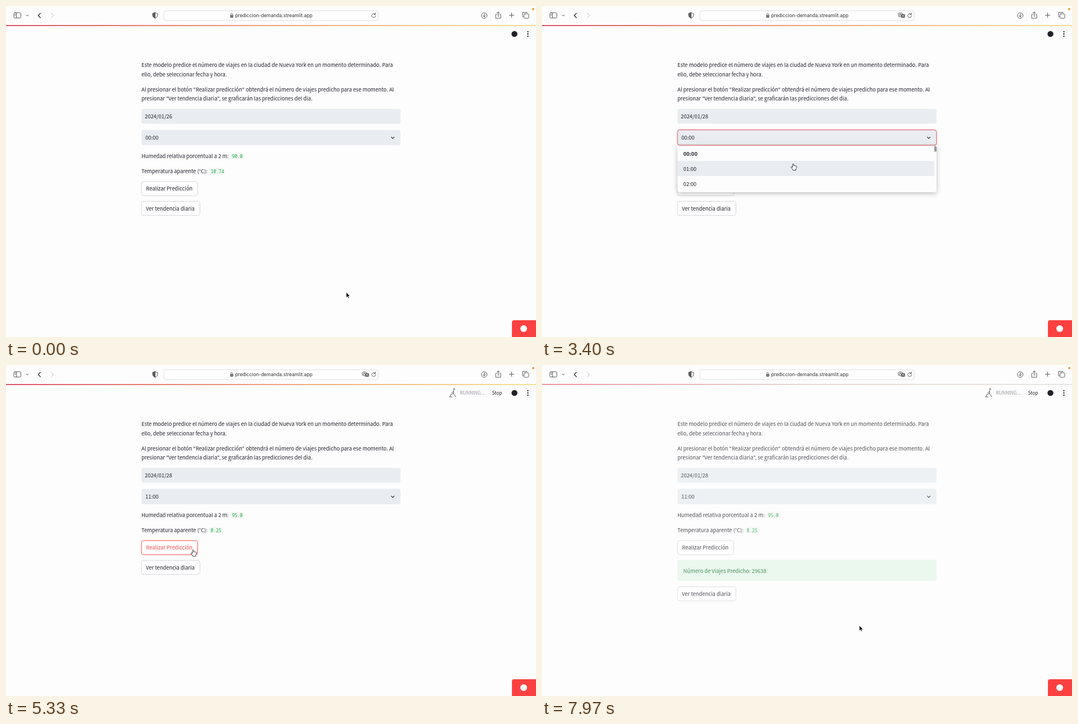
Recreate the animation shown at these times as an HTML page. Size 947 px wide and 592 px high, loop 8000 ms.

```html
<!DOCTYPE html>
<html lang="es">
<head>
<meta charset="utf-8">
<title>Predicción de demanda</title>
<style>
  html, body { margin: 0; width: 100%; height: 100%; overflow: hidden; background: #fdfdfd; }
  svg { display: block; width: 100vw; height: 100vh; }
  text { font: 9.4px "Noto Sans CJK SC", "Noto Sans CJK JP", "Noto Sans CJK", "Open Sans", sans-serif; fill: #202129; }
  .code { font: 8px "Noto Sans Mono", "DejaVu Sans Mono", monospace; fill: #17ab42; }
  .url { font: 8.5px Inter, Roboto, sans-serif; fill: #333; }
  .small { font-size: 8.25px; }
  .mid { text-anchor: middle; }
  .line { fill: none; stroke: #5b5b5d; stroke-width: 1; stroke-linecap: round; stroke-linejoin: round; }
  .dark { stroke: #202129; stroke-width: 1.2; }
  .field { fill: #e9edf1; }
  .focus { stroke: #dc4a54; }
  .button rect { fill: #fefefe; stroke: #d5d6da; }
  .hover rect { stroke: #ff4b4b; }
  .hover text { fill: #ff4b4b; }
  .panel { filter: drop-shadow(0 2px 4px #0004); }
</style>
</head>
<body>
<svg viewBox="0 0 947 592">
  <defs>
    <linearGradient id="warm">
      <stop stop-color="#d9405a"/><stop offset=".55" stop-color="#f0a070"/><stop offset="1" stop-color="#f5e088"/>
    </linearGradient>
    <linearGradient id="pale">
      <stop stop-color="#dd5a60"/><stop offset=".5" stop-color="#dcc0b8"/><stop offset="1" stop-color="#d8d8d4"/>
    </linearGradient>
    <clipPath id="listClip"><rect x="242" y="250" width="463" height="83" rx="4"/></clipPath>
  </defs>
  <rect width="947" height="592" fill="#fdfdfd"/>

  <!-- browser bar -->
  <g class="line">
    <rect x="14" y="12" width="12.500" height="9.500" rx="2"/><path d="M18.500 12v9.500M16 14.500h1M16 16.500h1"/>
    <path d="M36 16l2 2 2-2"/>
    <path class="dark" d="M61.500 13l-4 4 4 4"/><path stroke="#bbb" d="M81 13l4 4-4 4"/>
    <path d="M266.500 12l4.300 1.600v3.400q0 3-4.300 5-4.300-2-4.300-5v-3.400z"/>
    <path fill="#5b5b5d" d="M266.500 12v10q-4.300-2-4.300-5v-3.400z"/>
    <circle cx="854.500" cy="17" r="5"/><path d="M854.500 14v5.500m-2-2l2 2 2-2"/>
    <path d="M877 15h-2v7h9v-7h-2M879.500 19v-8.500m-2.300 2.300l2.300-2.300 2.300 2.300"/>
    <path d="M899.500 16.500h8M903.500 12.500v8"/>
    <path d="M924 19.500h-1v-8h8v1"/><rect x="925.500" y="14" width="8.500" height="8" rx="1.500"/>
  </g>
  <rect x="282" y="8.500" width="383" height="17.500" rx="4" fill="#fefefe" stroke="#dedede"/>
  <rect x="400.500" y="16" width="5.500" height="5" rx="1" fill="#777"/>
  <path class="line" stroke="#777" d="M401.700 16v-1.500q1.600-2.800 3.200 0v1.500"/>
  <text class="url mid" x="478.500" y="20">prediccion-demanda.streamlit.app</text>
  <path class="line" d="M659.800 15a3.500 3.500 0 1 0 .7 2.500M660 12.500v2.700h-2.700" stroke-width=".8"/>
  <g id="translate">
    <rect x="636.800" y="12.500" width="7" height="6.500" rx="1.500" class="line"/>
    <rect x="641.500" y="14.500" width="7" height="6.500" rx="1.500" fill="#5b5b5d"/>
    <path class="line" d="M638.500 17.500l1.700-3.500 1 2.500"/><path d="M643.500 19.500l1.500-3.500 1.500 3.500" fill="none" stroke="#fff" stroke-width=".8"/>
  </g>
  <circle cx="942" cy="5.500" r="2" fill="#f59a2c"/>
  <path d="M0 34.500h947" stroke="#e3e3e3"/>
  <rect id="stripe" y="34" width="947" height="1.800"/>

  <!-- app bar -->
  <circle cx="908.500" cy="50" r="5.300" fill="#202129"/>
  <g fill="#202129"><circle cx="932.500" cy="46" r="1.200"/><circle cx="932.500" cy="50" r="1.200"/><circle cx="932.500" cy="54" r="1.200"/></g>
  <g id="running">
    <path id="athlete" class="line" transform="translate(792 42)" stroke-width="1.500"/>
    <text class="small" x="811" y="53.200" style="fill:#92939a">RUNNING...</text>
    <text class="small" x="868.500" y="53.200">Stop</text>
  </g>

  <g id="content">
    <text x="242" y="109">Este modelo predice el número de viajes en la ciudad de Nueva York en un momento determinado. Para</text>
    <text x="242" y="125.500">ello, debe seleccionar fecha y hora.</text>
    <text x="242" y="152.500">Al presionar el botón "Realizar predicción" obtendrá el número de viajes predicho para ese momento. Al</text>
    <text x="242" y="169">presionar "Ver tendencia diaria", se graficarán las predicciones del dia.</text>
    <rect id="dateField" class="field" x="242" y="184" width="463" height="26.500" rx="4"/>
    <text id="date" x="248" y="201.300"></text>
    <path id="caret" d="M298.300 192v11" stroke="#202129" stroke-width=".9"/>
    <rect id="hourField" class="field" x="242" y="221.500" width="463" height="27.500" rx="4"/>
    <text id="hour" x="249" y="239"></text>
    <path class="line dark" d="M688.500 234.300l2.500 2.500 2.500-2.500"/>
    <text x="242" y="272">Humedad relativa porcentual a 2 m:</text>
    <rect x="401.500" y="262.500" width="24" height="12" rx="2" fill="#f5f7f4"/>
    <text id="humidity" class="code" x="403.700" y="271.800"></text>
    <text x="242" y="299">Temperatura aparente (°C):</text>
    <rect id="heatBox" x="363.500" y="289.500" height="12" rx="2" fill="#f5f7f4"/>
    <text id="heat" class="code" x="365.700" y="298.800"></text>
    <g id="predict" class="button"><rect x="242" y="314" width="100.500" height="25.300" rx="4"/><text x="250.300" y="330.300">Realizar Predicción</text></g>
    <g id="result">
      <rect x="242" y="348.500" width="463" height="37.500" rx="4" fill="#e5f6ea"/>
      <text x="252.500" y="371.800" style="fill:#177233">Número de Viajes Predicho: 29638</text>
    </g>
    <g id="trend" class="button"><rect x="242" y="349.300" width="104.500" height="25.300" rx="4"/><text x="250" y="365.800">Ver tendencia diaria</text></g>
  </g>

  <g id="calendar" class="panel">
    <rect x="242.500" y="216.500" width="204.500" height="211" rx="4" fill="#fcfcfd"/>
    <path class="field" d="M242.500 278.500v-58q0-4 4-4h196.500q4 0 4 4v58z"/>
    <path class="line" stroke="#c3c6cc" style="stroke:#c3c6cc" d="M262.500 234l-2.500 2.800 2.500 2.800"/>
    <path class="line dark" d="M426.800 234l2.500 2.800-2.500 2.800M334 236l2 2 2-2M395 236l2 2 2-2"/>
    <text x="286.800" y="240.300">January</text><text x="362.800" y="240.300">2024</text>
    <g id="days"></g>
  </g>

  <g id="dropdown" class="panel">
    <rect x="242" y="250" width="463" height="83" rx="4" fill="#fdfdfe"/>
    <g clip-path="url(#listClip)">
      <rect id="rowHover" x="242" width="459" height="27" fill="#e9ecf1"/>
      <g id="hours"></g>
      <rect id="thumb" x="701" width="4" height="10.500" rx="1.500" fill="#96979c"/>
    </g>
  </g>

  <path d="M904 592v-26q0-4 4-4h39v30z" fill="#ff4040"/>
  <circle cx="925" cy="577" r="6" fill="#fff"/>

  <g id="cursor">
    <path id="arrow" d="M0 0v9.500l2.200-2 1.500 3.400 1.500-.7-1.500-3.300h3z" stroke="#fff" stroke-width=".7"/>
    <path id="hand" d="M-1.200 6.500v-5.800q1.100-1.500 2.200 0v3q1-.8 1.900.1 1-.6 1.700.3 1.300-.5 1.500.9 0 3-1.500 4.500v2h-5q-.5-2-3.800-5.300 .6-1.600 2.200-.3z" fill="#fff" stroke="#222" stroke-width=".9"/>
    <path id="ibeam" class="line dark" d="M-2-5.500q2 0 2 1 0-1 2-1M0-4.500v9M-2 5.500q2 0 2-1 0 1 2 1M-1 1h2"/>
  </g>
</svg>
<script>
const LOOP = 8000;
const el = id => document.getElementById(id);
const clamp = v => Math.max(0, Math.min(1, v));
const smooth = p => p * p * (3 - 2 * p);
const within = (t, a, b) => t >= a && t < b;
const show = (id, on) => el(id).style.display = on ? '' : 'none';
const label = (x, y, content, style = '') => `<text class="mid" x="${x}" y="${y}" style="${style}">${content}</text>`;

// time, x, y, pointer shape
const path = [
  [0, 608, 512, 'arrow'], [150, 608, 512, 'arrow'], [650, 410, 198, 'ibeam'], [850, 400, 199, 'ibeam'],
  [950, 380, 235, 'hand'], [1240, 274, 412, 'hand'], [1300, 274, 412, 'hand'], [1400, 263, 408, 'hand'],
  [1520, 264, 407, 'arrow'], [2200, 686, 238, 'ibeam'], [2300, 689, 236, 'ibeam'], [2850, 689, 236, 'ibeam'],
  [2950, 670, 250, 'hand'], [3350, 449, 282, 'hand'], [3900, 447, 290, 'hand'], [3960, 447, 291, 'arrow'],
  [4500, 403, 327, 'arrow'], [4800, 402, 327, 'arrow'], [5080, 325, 328, 'hand'], [5260, 318, 328, 'hand'],
  [5400, 350, 333, 'arrow'], [5800, 531, 357, 'arrow'], [6700, 531, 357, 'arrow'], [7150, 335, 409, 'hand'],
  [7430, 325, 411, 'hand'], [7540, 350, 418, 'arrow'], [7900, 567, 466, 'arrow'], [LOOP, 567, 466, 'arrow']
];
const runs = [[1450, 2700], [3900, 4950], [5230, 6500], [7430, LOOP]];
const head = (x, y) => `M${x} ${y}a1.3 1.3 0 1 0 .1 0`;
const poses = [
  head(7.5, 0) + 'M7 4L5 9L8 11L7 15M5 9L3 12L0 13M7 4L3 5L1 8M7 4L9 7L11 7',
  head(9, 0) + 'M8 4L6 9H10L11 14M4 8a3.500 3.500 0 1 0 4 5M8 5L4 5L2 8',
  head(8.5, 0) + 'M8 4L7 9L3 11L1 15M7 9L10 12L11 15M8 5L4 8M1 15H5'
];

const columnX = c => 261.6 + 27.6 * c;
let cells = ['Su', 'Mo', 'Tu', 'We', 'Th', 'Fr', 'Sa']
  .map((d, c) => label(columnX(c), 271.8, d, 'fill:#55565f')).join('');
cells += '<circle cx="399.700" cy="379" r="14" fill="#ff4040"/>';
for (let day = 1; day <= 31; day++) {
  const color = day < 26 ? '#8d8e97' : day === 26 ? '#fff' : '#202129';
  cells += label(columnX(day % 7), 299.2 + 27.65 * Math.floor(day / 7), day, `font-size:8.3px;fill:${color}`);
}
el('days').innerHTML = cells;
el('hours').innerHTML = Array.from({ length: 24 }, (_, h) =>
  `<text x="252.500" y="${267.5 + 27 * h}" font-weight="${h ? 400 : 700}" style="font-weight:${h ? 400 : 700}">${String(h).padStart(2, '0')}:00</text>`).join('');

function moveCursor(t) {
  const i = path.findLastIndex(k => k[0] <= t);
  const [t0, x0, y0, shape] = path[i];
  const [t1, x1, y1] = path[i + 1];
  const p = smooth((t - t0) / (t1 - t0));
  el('cursor').setAttribute('transform', `translate(${x0 + (x1 - x0) * p} ${y0 + (y1 - y0) * p})`);
  for (const name of ['arrow', 'hand', 'ibeam']) show(name, name === shape);
}

function render(t) {
  const run = runs.find(([a, b]) => within(t, a, b));
  show('running', run);
  el('athlete').setAttribute('d', poses[Math.floor(t / 150) % 3]);
  el('content').style.opacity = run ? 1 - .63 * clamp((t - run[0] - 300) / 450) ** 1.7 : 1;

  const thin = within(t, 870, 1670) || within(t, 4200, 5030) || t >= 7500;
  el('stripe').setAttribute('height', thin ? 1.2 : 1.8);
  el('stripe').setAttribute('fill', `url(#${thin ? 'pale' : 'warm'})`);
  show('translate', t >= 1700);

  const picking = within(t, 870, 1450), choosing = within(t, 2880, 3900);
  show('calendar', picking);
  show('caret', picking);
  show('dropdown', choosing);
  el('dateField').classList.toggle('focus', picking);
  el('hourField').classList.toggle('focus', within(t, 2850, 5230));

  const scroll = 270 * smooth(clamp((t - 3450) / 350));
  el('hours').setAttribute('transform', `translate(0 ${-scroll})`);
  el('thumb').setAttribute('y', 250 + scroll * 83 / 648);
  el('rowHover').setAttribute('y', t < 3150 ? 250 : 277 + Math.ceil(scroll / 27) * 27 - scroll);

  const heat = t < 2700 ? '10.74' : t < 4950 ? '3.22' : '0.25';
  el('date').textContent = t < 1450 ? '2024/01/26' : '2024/01/28';
  el('hour').textContent = t < 3900 ? '00:00' : '11:00';
  el('humidity').textContent = t < 2700 ? '90.0' : '95.0';
  el('heat').textContent = heat;
  el('heatBox').setAttribute('width', 4.8 * heat.length + 4.5);

  const predicted = t >= 6500;
  show('result', predicted);
  el('trend').setAttribute('transform', `translate(0 ${predicted ? 47.3 : 0})`);
  el('predict').classList.toggle('hover', within(t, 5080, 5400));
  el('trend').classList.toggle('hover', within(t, 7150, 7540));
  moveCursor(t);
}

function tick() {
  render(performance.now() % LOOP);
  requestAnimationFrame(tick);
}
tick();
</script>
</body>
</html>
```
